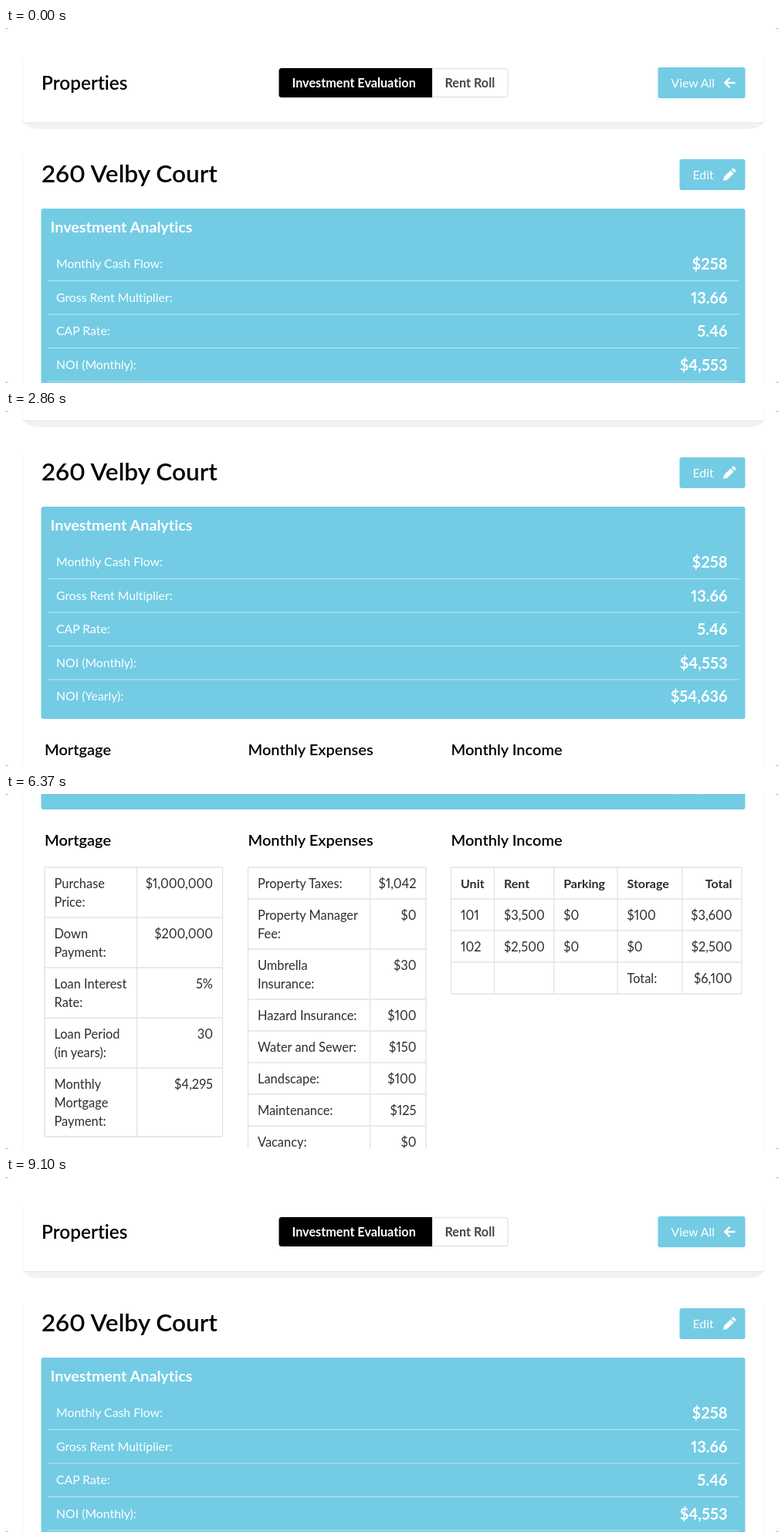
An HTML page for the animation above (9.23 s loop, 1000 by 460 pixels).

```html
<!DOCTYPE html>
<html lang="en">
<head>
<meta charset="utf-8">
<title>Property overview</title>
<style>
  html, body { margin: 0; width: 100%; height: 100%; overflow: hidden; background: #fff; }
  svg { display: block; width: 100%; height: 100%; }
  text {
    font: 400 16px Lato, "Open Sans", sans-serif;
    font-variant-numeric: proportional-nums;
    font-variant-ligatures: none;
    fill: #000;
  }
  text.title { font-size: 31.6px; font-weight: 600; }
  text.section { font-size: 24.4px; font-weight: 600; }
  text.heading { font-size: 20px; font-weight: 600; }
  text.panel { font-size: 19.8px; font-weight: 700; fill: #fff; }
  text.value { font-size: 20px; font-weight: 700; fill: #fff; }
  text.label { font-size: 15.8px; fill: #fff; }
  text.tab { font-size: 16.2px; font-weight: 700; }
  text.cell { font-size: 16.4px; fill: #2d2d2d; }
  text.head { font-weight: 700; fill: #2d2d2d; }
</style>
</head>
<body>
<svg viewBox="0 0 1000 460" xmlns="http://www.w3.org/2000/svg">
  <g id="page"></g>
  <path fill="#777" d="M0 0h3q-3 0-3 3zM1000 0v3q0-3-3-3zM0 460v-3q0 3 3 3zM1000 460h-3q3 0 3-3z"/>
</svg>
<script>
const BLUE = '#73cce4', GRID = '#e4e4e4', FAINT = '#f3f3f3';
const LOOP = 9230, STEP = 130;
const page = document.getElementById('page');

function add(tag, attrs, content = '') {
  const node = document.createElementNS('http://www.w3.org/2000/svg', tag);
  for (const name in attrs) node.setAttribute(name, attrs[name]);
  node.textContent = content;
  page.append(node);
  return node;
}
const text = (x, y, content, cls, anchor = 'start') =>
  add('text', { x, y, class: cls, 'text-anchor': anchor }, content);
const box = (x, y, width, height, fill, rx = 0) => add('rect', { x, y, width, height, fill, rx });
const path = (d, fill, stroke = 'none', width = 1) =>
  add('path', { d, fill, stroke, 'stroke-width': width });

function header() {
  text(85, -35, 'Review all properties quickly with clear numbers and totals so', 'intro');
  text(568, -35, 'plan monthly and for each property', 'intro');

  path('M21.5 40V122M982.5 40V122M21.5 165V1100M982.5 165V1100', 'none', FAINT);
  path('M22 122H982Q978 131 958 131H46Q28 131 22 122z', '#f2f2f2');
  path('M21 122.5H982', 'none', '#e9e9e9');

  text(46, 80, 'Properties', 'section');
  path('M552 52.5H646.5a3.5 3.5 0 0 1 3.5 3.5V86a3.5 3.5 0 0 1-3.5 3.5H552z', '#fff', '#e4e4e4', 1.3);
  path('M552 52V90H357a3.5 3.5 0 0 1-3.5-3.5V55.5a3.5 3.5 0 0 1 3.5-3.5z', '#000');
  text(370.5, 77, 'Investment Evaluation', 'tab').style.fill = '#fff';
  text(568.5, 77, 'Rent Roll', 'tab').style.fill = '#444';

  box(842, 49, 118, 45, '#f5fafc', 5);
  box(844.5, 51, 113, 40, BLUE, 3);
  text(861.5, 77, 'View All', 'label');
  path('M944.5 71H931.5M937.5 64.8L931.3 71L937.5 77.2', 'none', '#fff', 2.4);

  text(46, 200, '260 Velby Court', 'title');
  box(872.5, 170, 85, 40, BLUE, 3);
  text(889.5, 196, 'Edit', 'label');
  path('M929 198l1.2-5.2 8.4-8.4 4 4-8.4 8.4zM939.6 183.4l1.4-1.4q1-1 2 0l2 2q1 1 0 2l-1.4 1.4z', '#fff');
}

function analytics(rows) {
  box(45.5, 234, 912, 275, BLUE, 3);
  text(57.5, 265, 'Investment Analytics', 'panel');
  rows.forEach(([label, value], i) => {
    const y = 311 + i * 43.5;
    text(65, y, label, 'label');
    text(934.5, y + 2.3, value, 'value', 'end');
    if (i < rows.length - 1) path(`M53.5 ${y + 16.5}H949.5`, 'none', '#c0e7f2', 1.2);
  });
}

// Row height follows the largest number of text lines; the last column is right-aligned.
function table(title, edges, rows, hasHead) {
  const top = 584, left = edges[0], right = edges[edges.length - 1];
  text(left, 556, title, 'heading');
  let y = top, grid = `M${left} ${top}H${right}`;
  rows.forEach((row, r) => {
    row.forEach((cell, c) => {
      const last = c === row.length - 1;
      const x = last ? right - 12.5 : edges[c] + 12.5;
      cell.split('\n').forEach((line, i) =>
        text(x, y + 27 + i * 24, line, hasHead && r === 0 ? 'head' : 'cell', last ? 'end' : 'start'));
    });
    y += 17 + 24 * Math.max(...row.map(cell => cell.split('\n').length));
    grid += `M${left} ${y}H${right}`;
  });
  for (const x of edges) grid += `M${x} ${top}V${y}`;
  path(grid, 'none', GRID, 1.4);
}

header();
analytics([
  ['Monthly Cash Flow:', '$258'],
  ['Gross Rent Multiplier:', '13.66'],
  ['CAP Rate:', '5.46'],
  ['NOI (Monthly):', '$4,553'],
  ['NOI (Yearly):', '$54,636']
]);
table('Mortgage', [50, 169.5, 280.5], [
  ['Purchase\nPrice:', '$1,000,000'],
  ['Down\nPayment:', '$200,000'],
  ['Loan Interest\nRate:', '5%'],
  ['Loan Period\n(in years):', '30'],
  ['Monthly\nMortgage\nPayment:', '$4,295']
]);
table('Monthly Expenses', [313.5, 471.5, 544], [
  ['Property Taxes:', '$1,042'],
  ['Property Manager\nFee:', '$0'],
  ['Umbrella\nInsurance:', '$30'],
  ['Hazard Insurance:', '$100'],
  ['Water and Sewer:', '$150'],
  ['Landscape:', '$100'],
  ['Maintenance:', '$125'],
  ['Vacancy:', '$0']
]);
table('Monthly Income', [576.5, 632.5, 709.7, 792, 875.8, 953], [
  ['Unit', 'Rent', 'Parking', 'Storage', 'Total'],
  ['101', '$3,500', '$0', '$100', '$3,600'],
  ['102', '$2,500', '$0', '$0', '$2,500'],
  ['', '', '', 'Total:', '$6,100']
], true);

// Scroll position over time: [ms, px]
const SCROLL = [
  [0, 0], [2340, 0], [2600, 2], [2730, 30], [2860, 110], [2990, 220], [3120, 330], [3250, 414],
  [3380, 450], [3510, 469], [3640, 479], [3900, 486], [4160, 489],
  [6370, 489], [6500, 465], [6630, 320], [6760, 110], [6890, -33], [7020, -36],
  [7150, -24], [7280, -13], [7410, -7], [7540, -4], [7800, -1], [8190, 0], [LOOP, 0]
];

function scrollAt(time) {
  const i = SCROLL.findIndex(([t]) => t > time);
  const [t0, s0] = SCROLL[i - 1], [t1, s1] = SCROLL[i];
  return s0 + (s1 - s0) * (time - t0) / (t1 - t0);
}

function draw() {
  const time = Math.floor(performance.now() % LOOP / STEP) * STEP;
  page.setAttribute('transform', `translate(0 ${-Math.round(scrollAt(time))})`);
  requestAnimationFrame(draw);
}
draw();
</script>
</body>
</html>
```
